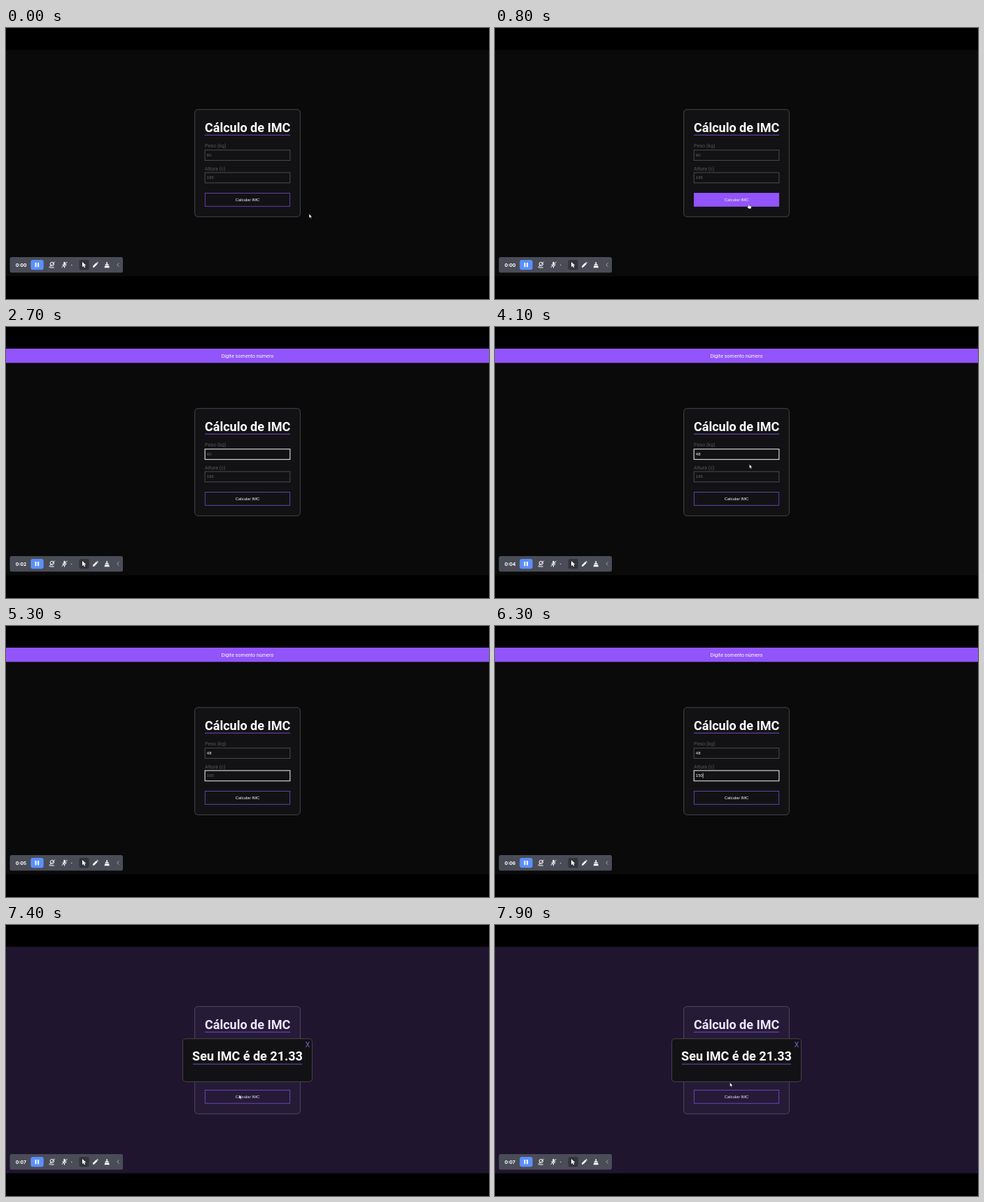
Animation, 690 px wide and 388 px high, one loop 8000 ms. Source, as an HTML page:

```html
<!DOCTYPE html>
<html lang="pt">
<head>
<meta charset="utf-8">
<title>Cálculo de IMC</title>
<style>
  html, body { margin: 0; width: 100%; height: 100%; overflow: hidden; background: #000; }
  svg { display: block; }
  text { font: 7.2px Roboto, sans-serif; fill: #fff; white-space: pre; }
  .title { font-weight: 700; font-size: 18px; }
  .label { fill: #56565a; }
  .control { font: 6px "Liberation Sans", Arial, sans-serif; }
  .mid { text-anchor: middle; }
  .rule { fill: #7d50d8; }
  .field { fill: #121214; stroke: #505054; stroke-width: .9; }
  .field.focus { stroke: #e2e2e4; stroke-width: 1.1; }
  .hint { fill: #666669; }
  .button { fill: #121214; stroke: #6a45b5; stroke-width: .9; }
  .button.hover { fill: #9254fb; stroke: #9254fb; }
  .clock { font: 700 6.7px Inter, sans-serif; }
  .line { fill: none; stroke: #fff; stroke-width: 1; stroke-linecap: round; stroke-linejoin: round; }
  .pointer { fill: #fff; stroke: #000; stroke-width: .4; }
</style>
</head>
<body>
<svg width="690" height="388" viewBox="0 0 690 388">
  <rect y="31.5" width="690" height="324" fill="#0a0a0a"/>

  <rect x="269.7" y="116.7" width="150.6" height="153.6" rx="4.5" fill="#121214" stroke="#4c4c50" stroke-width=".9"/>
  <text class="title" x="284" y="149">Cálculo de IMC</text>
  <rect class="rule" x="284" y="152.8" width="122" height=".9"/>

  <text class="label" x="284" y="171.4">Peso (kg)</text>
  <rect class="field" id="weightBox" x="284.2" y="174.8" width="121.6" height="14.8"/>
  <text class="control" id="weight" x="286.8" y="184"></text>
  <text class="label" x="284" y="203.7">Altura (c)</text>
  <rect class="field" id="heightBox" x="284.2" y="207" width="121.6" height="14.8"/>
  <text class="control" id="height" x="286.8" y="216.2"></text>
  <rect id="caret" width=".6" height="7.4" fill="#fff"/>

  <rect class="button" id="button" x="284.4" y="236.5" width="121.2" height="18.8"/>
  <text class="control mid" x="345" y="247.9">Calcular IMC</text>

  <g id="toast">
    <rect y="31" width="690" height="20.4" fill="#9254fb"/>
    <text class="mid" x="345" y="43.8">Digite somento número</text>
  </g>

  <g id="modal">
    <rect y="31" width="690" height="324.5" fill="#9254fb" opacity=".15"/>
    <rect x="252.6" y="162.8" width="184.8" height="61.6" rx="4.5" fill="#121214" stroke="#4c4c50" stroke-width=".9"/>
    <text class="title mid" x="345" y="194.4">Seu IMC é de 21.33</text>
    <rect class="rule" x="267" y="198.7" width="156" height=".9"/>
    <text x="427.4" y="175.2" style="font-size:10.8px;fill:#8257e5">X</text>
  </g>

  <rect x="5.5" y="328" width="161.5" height="22.3" rx="2.5" fill="#4a4c57"/>
  <text class="clock" id="clock" x="13.8" y="341.5"></text>
  <rect x="35.3" y="332" width="18.4" height="14.2" rx="3" fill="#5b8ff9"/>
  <path d="M41.6 336h1.9v6.2h-1.9zM45.2 336h1.9v6.2h-1.9z" fill="#fff"/>
  <g class="line">
    <circle cx="65.8" cy="338" r="2.7"/>
    <path d="M63 343h5.4M61.8 342.6l7.6-7.6"/>
    <path d="M83.4 335.6v3.2M81 338.6a2.5 2.5 0 0 0 5 0M83.5 341.4v1.8M80 342.6l7.2-7.4"/>
    <path d="M83.5 335.8v2.8" stroke-width="2.2"/>
    <path d="M161.2 336.6l-2.4 2.4 2.4 2.4" stroke="#b9bac2" stroke-width=".8"/>
  </g>
  <circle cx="93.7" cy="339.4" r=".7" fill="#ddd"/>
  <rect x="104.6" y="332" width="14" height="14.2" rx="2.5" fill="#33343b"/>
  <g fill="#fff">
    <path d="M109 335v7.2l1.7-1.5 1.3 2.6 1.3-.7-1.3-2.4 2.3-.3z"/>
    <path d="M123.8 343l.6-2.4 4.6-4.6 1.8 1.8-4.6 4.6zM129.6 335.4l.6-.6 1.8 1.8-.6.6z"/>
    <path d="M143.5 335h1.4v3h1.7v1.5h-4.8V338h1.7zM141.4 340.2h5.6l.9 3h-7.4z"/>
  </g>

  <path class="pointer" id="arrow" d="M0 0v6l1.4-1.2.9 2 1-.4-.9-2h1.8z"/>
  <path class="pointer" id="hand" d="M0 .6q.7-1 1.3 0v2.2l3 .7q.6.2.5 1l-.5 2.8h-3.6l-2-2.7q0-.9.8-.6l.5.5z"/>
</svg>
<script>
const LOOP = 8000, STEP = 100;
const $ = id => document.getElementById(id);
const show = (id, on) => $(id).style.display = on ? "" : "none";

// time, x, y of the pointer tip
const path = [
  [0, 433, 266], [100, 432, 265], [600, 361.5, 251.5], [1700, 361.5, 251.5],
  [2100, 372, 183], [6500, 352, 214], [7200, 333, 243], [7700, 333, 243], [7900, 335.5, 225.5]
];
// time, text typed so far
const fields = {
  weight: { hint: "60", y: 178.3, focus: [2200, 4700], keys: [[3100, "4"], [3600, "48"]] },
  height: { hint: "165", y: 210.5, focus: [4700, 7100], keys: [[5700, "1"], [5900, "15"], [6200, "150"]] }
};

function pointerAt(t) {
  const next = path.findIndex(p => p[0] > t);
  if (next < 0) return path.at(-1).slice(1);
  const [t0, x0, y0] = path[next - 1], [t1, x1, y1] = path[next];
  const u = (t - t0) / (t1 - t0), k = u * u * (3 - 2 * u);
  return [x0 + (x1 - x0) * k, y0 + (y1 - y0) * k];
}

function drawField(id, t) {
  const { hint, y, focus: [start, end], keys } = fields[id];
  const [since, value] = keys.findLast(k => k[0] <= t) || [start, ""];
  const focused = t >= start && t < end;
  $(id).textContent = value || hint;
  $(id).classList.toggle("hint", !value);
  $(id + "Box").classList.toggle("focus", focused);
  if (focused) {
    $("caret").setAttribute("x", 286.8 + value.length * 3.34);
    $("caret").setAttribute("y", y);
    show("caret", (t - since) % 1000 < 500);
  }
}

function draw(t) {
  const done = t >= 7400;
  const [x, y] = pointerAt(t);
  const inside = (top, bottom) => !done && x > 284 && x < 406 && y > top && y < bottom;
  const onButton = inside(236, 256);
  const onField = inside(174, 190) || inside(206, 223);

  show("caret", false);
  drawField("weight", t);
  drawField("height", t);
  $("button").classList.toggle("hover", onButton);
  show("toast", t >= 1200 && !done);
  show("modal", done);
  $("clock").textContent = "0:0" + Math.min(7, Math.floor((t + 100) / 1000));

  show("hand", onButton);
  show("arrow", !onButton && !onField);
  for (const id of ["hand", "arrow"]) $(id).setAttribute("transform", `translate(${x} ${y})`);
}

function tick() {
  const t = performance.now() % LOOP;
  draw(Math.floor(t / STEP) * STEP);
  requestAnimationFrame(tick);
}
tick();
</script>
</body>
</html>
```
